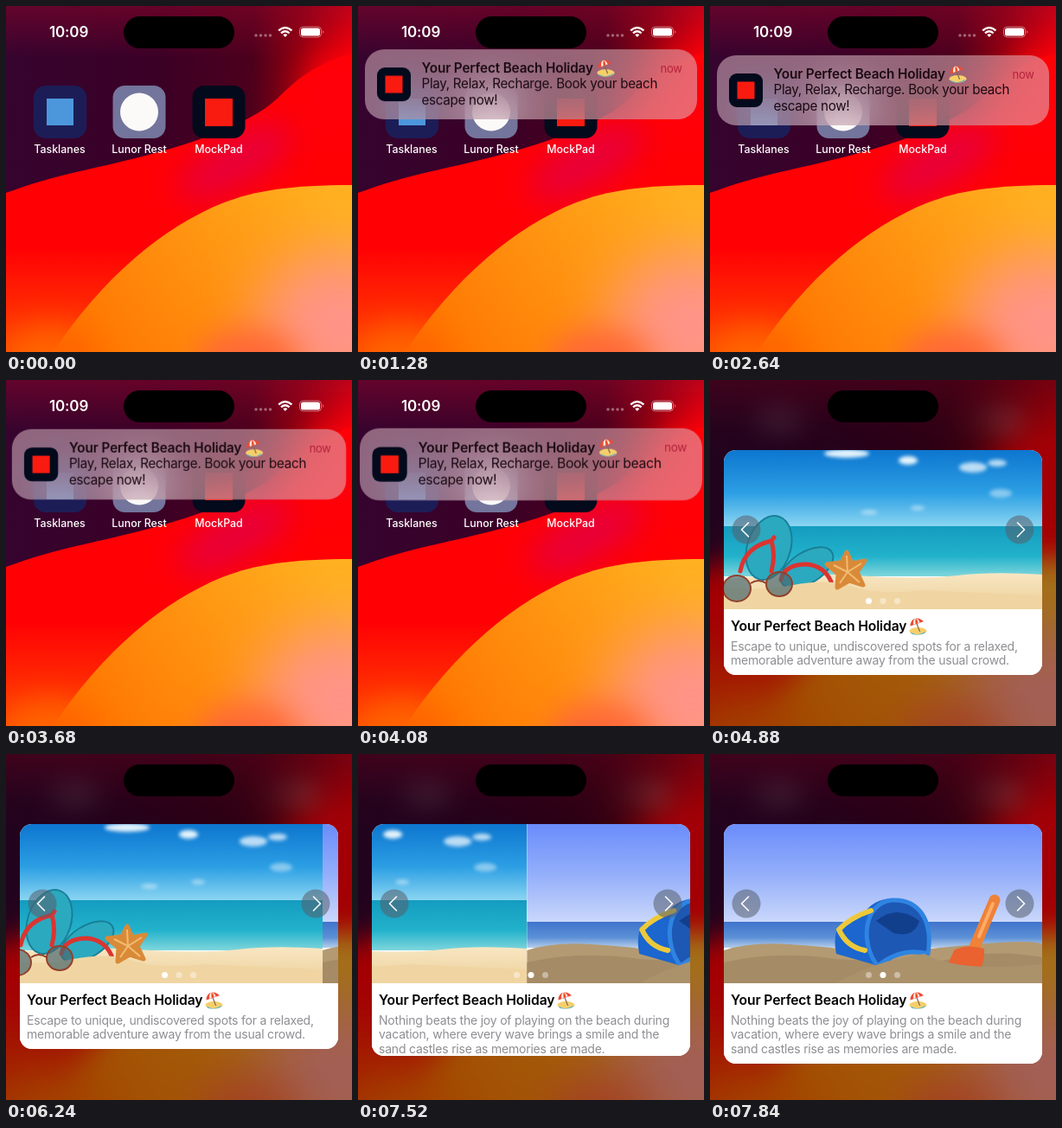
These frames come from a looping animation (400 px wide and 400 px high, 8000 ms). An HTML page:

```html
<!DOCTYPE html>
<html lang="en">
<head>
<meta charset="utf-8">
<title>Beach push notification</title>
<style>
html, body { margin: 0; width: 100%; height: 100%; overflow: hidden; background: #000; }
#stage { position: relative; width: 400px; height: 400px; overflow: hidden; }
#stage div, #stage svg { position: absolute; }
svg { display: block; font-family: Inter, sans-serif; letter-spacing: -.02em; }
#home { left: -60px; top: -60px; }
#banner { left: 8px; top: 0; width: 384px; height: 81px; border-radius: 22px;
  background: rgba(222, 186, 195, .54); backdrop-filter: blur(26px); }
#card { left: 16px; width: 368px; border-radius: 14px; background: #fff; overflow: hidden; }
#island { left: 136px; top: 12px; width: 128px; height: 37px; border-radius: 19px; background: #000; }
.title { font-weight: 600; letter-spacing: -.009em; }
.soft { filter: blur(18px); }
.label { font: 500 12.4px Inter, sans-serif; letter-spacing: 0; fill: #fff; text-anchor: middle; }
.note { font-size: 14px; letter-spacing: -.015em; fill: #8e8e93; }
</style>
</head>
<body>
<div id="stage">
  <svg id="home" width="520" height="520" viewBox="-60 -60 520 520">
    <defs>
      <linearGradient id="ground" x2="0" y2="1">
        <stop offset=".65" stop-color="#ff0004"/><stop offset=".95" stop-color="#ff5a00"/>
      </linearGradient>
      <linearGradient id="night" gradientUnits="userSpaceOnUse" x1="0" x2="395" y1="50" y2="70">
        <stop stop-color="#35042f"/><stop offset=".45" stop-color="#3b0026"/>
        <stop offset=".72" stop-color="#4c001c"/><stop offset=".86" stop-color="#92000f"/>
        <stop offset="1" stop-color="#f20008"/>
      </linearGradient>
      <linearGradient id="glow" gradientUnits="userSpaceOnUse" x1="0" x2="0" y1="-10" y2="60">
        <stop stop-color="#90052a" stop-opacity=".6"/><stop offset="1" stop-color="#90052a" stop-opacity="0"/>
      </linearGradient>
      <linearGradient id="hill" gradientUnits="userSpaceOnUse" x1="360" y1="205" x2="90" y2="400">
        <stop stop-color="#ffb020"/><stop offset=".5" stop-color="#ff9210"/><stop offset="1" stop-color="#ff7400"/>
      </linearGradient>
      <linearGradient id="sky1" x2="0" y2="1">
        <stop stop-color="#0d76cf"/><stop offset=".55" stop-color="#2c9fe4"/><stop offset="1" stop-color="#8fd8f2"/>
      </linearGradient>
      <linearGradient id="sea1" x2="0" y2="1">
        <stop stop-color="#149cc0"/><stop offset=".6" stop-color="#22b2cb"/><stop offset="1" stop-color="#7fd6dc"/>
      </linearGradient>
      <linearGradient id="sand1" x2="0" y2="1">
        <stop stop-color="#f8e6c2"/><stop offset="1" stop-color="#eccf9a"/>
      </linearGradient>
      <linearGradient id="sky2" x2="0" y2="1">
        <stop stop-color="#6a8cfb"/><stop offset=".5" stop-color="#93aefa"/><stop offset="1" stop-color="#cbd8fb"/>
      </linearGradient>
      <linearGradient id="sea2" x2="0" y2="1">
        <stop stop-color="#3f74cc"/><stop offset=".6" stop-color="#5c90d6"/><stop offset="1" stop-color="#b5cdea"/>
      </linearGradient>
      <clipPath id="hillClip"><path id="hillPath" d="M20 460C80 340 170 260 250 228C300 209 350 205 460 208V460Z"/></clipPath>
      <symbol id="umbrella" viewBox="0 0 20 20">
        <ellipse cx="10" cy="15.5" rx="9.5" ry="4" fill="#f6cf6b"/>
        <path d="M2 17q8 5 16-1q0 3-8 3.500t-8-2.500" fill="#43b5e0"/>
        <path d="M8 6l4 10" stroke="#8d6a4a" stroke-width="1.200"/>
        <path d="M1.500 10C1 2 10-2 16 5Z" fill="#ee4a32"/>
        <path d="M5 8.500Q4 3 7.500 1.400Q11 2.500 12 6Z" fill="#fff3e4"/>
        <path d="M7.200 7.800Q6.500 3.500 7.500 1.400Q9.500 3 10 6.800Z" fill="#ee4a32"/>
      </symbol>
    </defs>
    <rect x="-60" y="-60" width="520" height="520" fill="url(#ground)"/>
    <ellipse class="soft" cx="265" cy="180" rx="75" ry="28" fill="#e8003a" transform="rotate(-30 265 180)"/>
    <path d="M-60 -60V242C-20 222 30 203 90 190C170 172 250 152 300 118C330 98 340 60 460 40V-60Z" fill="url(#night)"/>
    <path d="M-60 -60H460V60H-60Z" fill="url(#glow)"/>
    <ellipse class="soft" cx="380" cy="105" rx="36" ry="50" fill="#ff000c"/>
    <use href="#hillPath" fill="url(#hill)"/>
    <ellipse class="soft" cx="50" cy="410" rx="55" ry="40" fill="#ff6400"/>
    <g clip-path="url(#hillClip)">
      <ellipse cx="385" cy="370" rx="95" ry="85" fill="#ff9488" style="filter:blur(34px)"/>
      <ellipse class="soft" cx="280" cy="410" rx="60" ry="36" fill="#ff6638"/>
    </g>
    <g id="chrome">
      <text x="50" y="36" font-size="17" class="title" fill="#fff">10:09</text>
      <path d="M289 34h.01M294.500 34h.01M300 34h.01M305.500 34h.01" stroke="#fff" stroke-opacity=".4" stroke-width="3.500" stroke-linecap="round"/>
      <g fill="none" stroke="#fff" stroke-width="2.400">
        <path d="M315.200 28.300q7.600-6.600 15.200 0M318 31.300q4.800-4 9.600 0"/>
        <path d="M320.300 33.200q2.500-1.800 5 0l-2.500 2.800z" fill="#fff" stroke="none"/>
      </g>
      <rect x="339.500" y="24" width="25" height="12" rx="4" fill="none" stroke="#fff" stroke-opacity=".45"/>
      <rect x="341" y="25.500" width="22" height="9" rx="2.600" fill="#fff"/>
      <path d="M366 28q2 2 0 4z" fill="#fff" fill-opacity=".5"/>
      <rect x="32" y="92" width="61" height="61" rx="14" fill="#1c1d57"/>
      <rect x="47" y="107" width="31" height="31" fill="#4c97dc"/>
      <rect x="123.500" y="92" width="61" height="61" rx="14" fill="#74759c"/>
      <circle cx="154" cy="122.500" r="22" fill="#fbfaf8"/>
      <rect x="215.500" y="92" width="61" height="61" rx="14" fill="#020a1c"/>
      <rect x="230" y="107" width="32" height="32" fill="#fa1b10"/>
      <text class="label" x="62" y="169.500">Tasklanes</text>
      <text class="label" x="154" y="169.500">Lunor Rest</text>
      <text class="label" x="246" y="169.500">MockPad</text>
    </g>
  </svg>

  <div id="banner">
    <svg width="384" height="81" font-size="15.200" fill="#1b0a12">
      <rect x="14" y="21" width="39" height="39" rx="9" fill="#020a1c"/>
      <rect x="23.500" y="30.500" width="20" height="20" fill="#fa1b10"/>
      <text class="title" x="65.500" y="27" font-size="15.300">Your Perfect Beach Holiday</text>
      <use href="#umbrella" x="268" y="11" width="21" height="21"/>
      <text x="366.500" y="26.500" font-size="13" text-anchor="end" fill="#b4233c">now</text>
      <text x="65.500" y="45">Play, Relax, Recharge. Book your beach</text>
      <text x="65.500" y="63.500">escape now!</text>
    </svg>
  </div>

  <div id="card">
    <svg width="368" height="280">
      <g id="pages">
        <svg width="368" height="184" viewBox="0 0 368 184">
          <rect width="368" height="90" fill="url(#sky1)"/>
          <g fill="#e4f3fc" style="filter:blur(2px)">
            <ellipse cx="142" cy="4" rx="26" ry="5"/><ellipse cx="213" cy="12" rx="11" ry="5"/>
            <ellipse cx="288" cy="20" rx="16" ry="6" opacity=".8"/><ellipse cx="316" cy="15" rx="11" ry="4" opacity=".8"/>
            <ellipse cx="320" cy="50" rx="13" ry="5" opacity=".5"/><ellipse cx="224" cy="67" rx="8" ry="3" opacity=".5"/>
            <ellipse cx="168" cy="72" rx="10" ry="3" opacity=".5"/>
          </g>
          <rect y="88" width="368" height="58" fill="url(#sea1)"/>
          <path d="M0 150Q70 140 150 145T270 145T368 144V184H0Z" fill="url(#sand1)"/>
          <g fill="#2ba9bf" stroke="#187f98" stroke-width="2">
            <ellipse cx="52" cy="113" rx="25" ry="38" transform="rotate(18 52 113)"/>
            <ellipse cx="96" cy="136" rx="18" ry="34" transform="rotate(58 96 136)"/>
          </g>
          <path d="M19 140Q24 112 55 105Q60 122 55 140M55 105l3-4M66 150Q70 132 96 132Q116 134 124 152" fill="none" stroke="#dc3430" stroke-width="5" stroke-linecap="round"/>
          <path d="M0 158Q40 164 80 156T150 158T230 162L368 168V184H0Z" fill="#f0d5a2"/>
          <path d="M142 118l6 13 15-3-9 13 7 15-16-5-14 8 1-16-13-11 17-2z" fill="#d98a38" stroke="#d98a38" stroke-width="5" stroke-linejoin="round"/>
          <path d="M142 122l1 19 16-10M143 141l14 12M143 141l-9 13M143 141l-16-8" fill="none" stroke="#f2bb70" stroke-width="2"/>
          <g fill="#4b6870" fill-opacity=".7" stroke="#92402c" stroke-width="2">
            <ellipse cx="15" cy="160" rx="16" ry="15"/><ellipse cx="64" cy="155" rx="15" ry="14"/>
            <path d="M31 154q9-6 18 0" fill="none"/>
          </g>
        </svg>
        <svg x="368" width="368" height="184" viewBox="0 0 368 184">
          <rect width="368" height="114" fill="url(#sky2)"/>
          <rect y="113" width="368" height="30" fill="url(#sea2)"/>
          <path d="M0 146Q30 136 75 139T150 146T270 141T368 139V184H0Z" fill="#b39a72"/>
          <path d="M0 160Q60 146 130 156L240 162Q300 142 368 154V184H0Z" fill="#a58c66"/>
          <path d="M130 124L160 106Q172 86 196 86L226 120L186 166L130 150Q127 136 130 124Z" fill="#1b66cf"/>
          <path d="M178 164C158 140 160 92 194 88C226 86 242 112 236 150Q205 142 178 164Z" fill="#1d58b4" stroke="#2f84e2" stroke-width="5" stroke-linejoin="round"/>
          <path d="M176 112Q200 92 226 112Q220 132 196 126Z" fill="#123f8c"/>
          <path d="M170 100Q146 108 133 122Q142 142 163 146" fill="none" stroke="#ecc93a" stroke-width="6" stroke-linecap="round" stroke-linejoin="round"/>
          <path d="M313 88L290 142" stroke="#ee8238" stroke-width="13" stroke-linecap="round"/>
          <path d="M311 92L295 130" stroke="#ffab66" stroke-width="4" stroke-linecap="round"/>
          <path d="M266 146Q280 138 301 144Q302 158 296 169L258 165Z" fill="#ea6230"/>
          <path d="M130 184Q180 156 232 150Q270 172 368 162V184Z" fill="#ab926b"/>
        </svg>
      </g>
      <g fill="none" stroke="#fff" stroke-width="1.600" stroke-linecap="round" stroke-linejoin="round">
        <g fill="#56606c" fill-opacity=".55" stroke="none"><circle cx="26" cy="92" r="16.500"/><circle cx="342" cy="92" r="16.500"/></g>
        <path d="M28.500 84l-8 8 8 8M339.500 84l8 8-8 8"/>
      </g>
      <g id="dots" fill="#fff"><circle cx="167.500" cy="174.500" r="3.500"/><circle cx="184" cy="174.500" r="3.500"/><circle cx="200.500" cy="174.500" r="3.500"/></g>
      <rect y="184" width="368" height="100" fill="#fff"/>
      <text class="title" x="8" y="209" font-size="15.700">Your Perfect Beach Holiday</text>
      <use href="#umbrella" x="214" y="193" width="21" height="21"/>
      <g id="notes" class="note">
        <g><text x="8" y="231.500">Escape to unique, undiscovered spots for a relaxed,</text>
          <text x="8" y="248">memorable adventure away from the usual crowd.</text></g>
        <g><text x="8" y="231.500">Nothing beats the joy of playing on the beach during</text>
          <text x="8" y="248">vacation, where every wave brings a smile and the</text>
          <text x="8" y="264.500">sand castles rise as memories are made.</text></g>
      </g>
    </svg>
  </div>
  <div id="island"></div>
</div>
<script>
const LOOP = 8000, STEP = 80;
const el = id => document.getElementById(id);
const [home, chrome, banner, card, pages, dots, notes] =
  ['home', 'chrome', 'banner', 'card', 'pages', 'dots', 'notes'].map(el);
const ramp = (t, from, to) => Math.min(1, Math.max(0, (t - from) / (to - from)));
const easeOut = p => 1 - (1 - p) ** 3;
const smooth = p => p * p * (3 - 2 * p);
const mix = (a, b, p) => a + (b - a) * p;

function render(time) {
  const t = Math.floor(time % LOOP / STEP) * STEP;

  // Banner drops in on a critically damped spring, then swells under a long press.
  const s = Math.max(0, t - 900) * .0129;
  const y = 57 - 157 * (1 + s) * Math.exp(-s);
  const press = smooth(ramp(t, 3520, 4080));
  const open = easeOut(ramp(t, 4080, 4400));
  banner.style.transform = `translateY(${y + 20 * open}px) scale(${1 + .031 * press})`;
  banner.style.opacity = 1 - open;
  banner.style.visibility = t < 960 || open === 1 ? 'hidden' : 'visible';

  home.style.filter = open ? `blur(${16 * open}px) brightness(${1 - .36 * open})` : 'none';
  const zoom = 1 - .05 * open;
  chrome.setAttribute('transform', `translate(200 380) scale(${zoom}) translate(-200 -380)`);

  // Card opens from the banner, settles, and later pages to the second picture.
  const settle = easeOut(ramp(t, 4400, 5040));
  const swipe = easeOut(ramp(t, 7440, 7840));
  const offset = t < 6240 ? 0 : mix(18, 368, swipe);
  card.style.visibility = open ? 'visible' : 'hidden';
  card.style.opacity = Math.min(1, open * 1.2);
  card.style.top = mix(56, 82, open) - 1.4 * settle + 'px';
  card.style.height = mix(83, 261, open) - settle + 17.5 * swipe + 'px';
  pages.setAttribute('transform', `translate(${-offset} 0)`);

  const page = Math.round(offset / 368);
  [...dots.children].forEach((dot, i) => dot.setAttribute('opacity', i === page ? 1 : .4));
  [...notes.children].forEach((note, i) => note.setAttribute('visibility', i === page ? 'visible' : 'hidden'));
}

function tick() {
  render(performance.now());
  requestAnimationFrame(tick);
}
tick();
</script>
</body>
</html>
```
